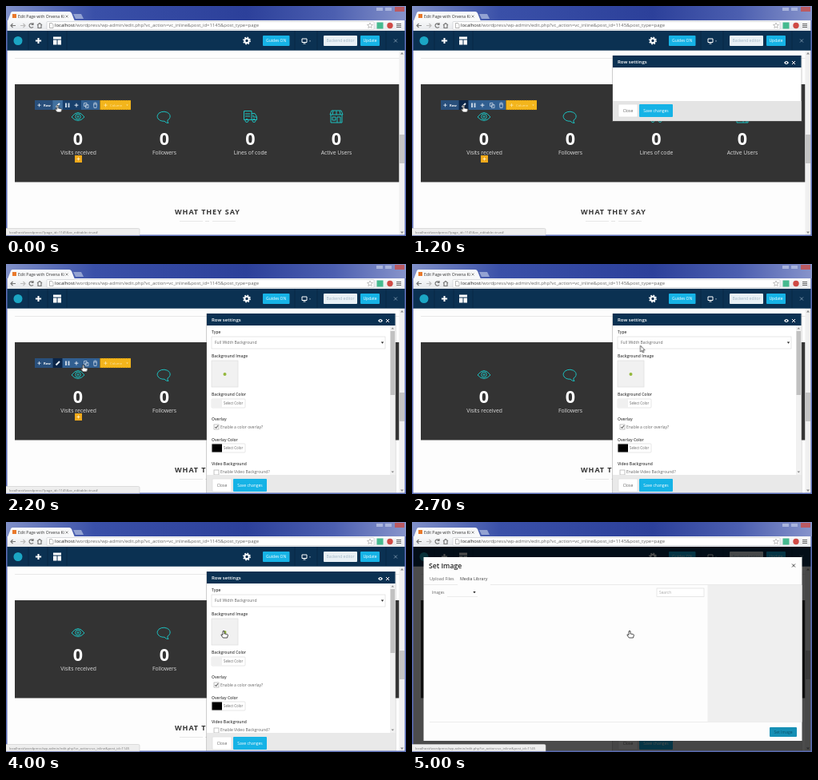
An HTML page that plays this animation: 500 px wide and 288 px high, repeating every 5.05 s.

```html
<!DOCTYPE html>
<html lang="en">
<head>
<meta charset="utf-8">
<title>Page editor</title>
<style>
html, body { margin: 0; width: 100%; height: 100%; overflow: hidden; background: #fff; }
svg { display: block; width: 100%; height: 100%; }
text { font-family: "Open Sans", "Noto Sans", sans-serif; font-size: 5px; fill: #666; }
.w { fill: #fff; }
.mid { text-anchor: middle; }
.label { font-weight: 600; fill: #444; }
.status text { font-size: 4.3px; fill: #777; }
.count { font-size: 21.5px; font-weight: 700; fill: #fff; text-anchor: middle; }
.caption { font-size: 6.8px; fill: #ddd; text-anchor: middle; }
.line { fill: none; stroke: #fff; stroke-width: 1; }
.teal { fill: none; stroke: #1cc0c0; stroke-width: 1; stroke-linejoin: round; }
.box { fill: #fff; stroke: #ddd; stroke-width: .7; }
.cyan { fill: #16b3e6; }
.navy { fill: #0b3152; }

/* 5050 ms loop; hard changes use step-end */
.t { animation: 5050ms step-end infinite; }
.idle { animation-name: idle; }
.hot { animation-name: hot; }
.tools { animation-name: tools; }
.link { animation-name: link; }
.panel { animation-name: panel; }
.short { animation-name: short; }
.full { animation-name: full; }
.over { animation-name: over; }
.modal { animation-name: modal; }
.hand { animation-name: hand; }
.arrow { animation-name: arrow; }
.pointer { animation: move 5050ms ease-in-out infinite; }
@keyframes idle { 0% { opacity: 1 } 4.95%, 100% { opacity: 0 } }
@keyframes hot { 0% { opacity: 0 } 4.95%, 100% { opacity: 1 } }
@keyframes tools { 0% { opacity: 1 } 50.5%, 100% { opacity: 0 } }
@keyframes link { 0% { opacity: 1 } 46.53%, 100% { opacity: 0 } }
@keyframes panel { 0% { opacity: 0 } 19.8%, 100% { opacity: 1 } }
@keyframes short { 0% { opacity: 1 } 30.69%, 100% { opacity: 0 } }
@keyframes full { 0% { opacity: 0 } 30.69%, 100% { opacity: 1 } }
@keyframes over { 0% { opacity: 0 } 77.23%, 100% { opacity: 1 } }
@keyframes modal { 0% { opacity: 0 } 96.04%, 100% { opacity: 1 } }
@keyframes hand { 0% { opacity: 1 } 46.53% { opacity: 0 } 75.25%, 100% { opacity: 1 } }
@keyframes arrow { 0% { opacity: 0 } 46.53% { opacity: 1 } 75.25%, 100% { opacity: 0 } }
@keyframes move {
  0%, 37.62% { transform: translate(63.5px, 124px); animation-timing-function: ease-in }
  43.56% { transform: translate(95px, 126px); animation-timing-function: ease-out }
  56.44%, 65.35% { transform: translate(302px, 100px) }
  76.24%, 100% { transform: translate(271px, 136px) }
}
</style>
</head>
<body>
<svg viewBox="0 0 500 288" preserveAspectRatio="none">
  <defs>
    <linearGradient id="frame" x2="1" y2="0">
      <stop stop-color="#8090c8"/><stop offset=".22" stop-color="#3a50a8"/>
      <stop offset=".6" stop-color="#2c409a"/><stop offset=".82" stop-color="#4c5fb0"/>
      <stop offset="1" stop-color="#8794cb"/>
    </linearGradient>
    <linearGradient id="chrome" x2="0" y2="1">
      <stop stop-color="#f8f9fa"/><stop offset="1" stop-color="#e6e8eb"/>
    </linearGradient>
    <path id="plus" d="M-3 0H3M0-3V3"/>
    <path id="cross" d="M-2-2 2 2M2-2-2 2"/>
    <path id="down" d="M-1.7-1H1.7L0 1.3Z"/>
    <path id="tick" d="M-1.7 0-.4 1.5 2-1.8"/>
    <path id="bubble" d="M0 278.5H165.5Q167 278.5 167 280V287H0Z" fill="#eee" stroke="#ccc" stroke-width=".6"/>
    <g id="swatch">
      <rect class="box" width="42" height="11" rx="1"/>
      <text x="15" y="7.4" style="font-size:4.4px">Select Color</text>
    </g>
    <g id="buttons">
      <rect class="box" x="258" width="24" height="16" rx="1"/>
      <text class="mid" x="270" y="9.8">Close</text>
      <rect class="cyan" x="284" width="42" height="16" rx="1"/>
      <text class="mid w" x="305" y="9.8">Save changes</text>
    </g>
  </defs>

  <!-- browser window -->
  <rect width="500" height="20" fill="url(#frame)"/>
  <path d="M463 2h8v4h-8zM474 2h8v4h-8z" fill="#a9b4dc"/>
  <path d="M486 1h12v6h-12z" fill="#bb5a62"/>
  <path d="M84 10h10l3 6H87z" fill="#93a2d2"/>
  <path d="M2 19 6 8.5Q6.5 7 8 7H79Q81 7 82 9L86 19Z" fill="#f8f9fa"/>
  <rect x="8" y="10" width="5" height="5" fill="#e9792b"/>
  <text x="15" y="15" style="font-size:5.1px;fill:#333">Edit Page with Orvena Ki</text>
  <use href="#cross" transform="translate(76 13) scale(.75)" stroke="#777"/>
  <rect y="18" width="500" height="13" fill="url(#chrome)"/>
  <g fill="none" stroke="#777" stroke-width="1.2">
    <path d="M12 24.5H6m2.5-2.5L6 24.5 8.5 27M39 24l3-2.5 3 2.5M40 24v3.5h4V24"/>
    <path d="M18 24.5h6m-2.5-2.5 2.5 2.5-2.5 2.5" stroke="#bbb"/>
    <path d="M34 23a2.7 2.7 0 1 0 0 3M34 21v2.3h-2.3"/>
  </g>
  <rect x="51" y="19.5" width="409" height="10" rx="1" fill="#fff" stroke="#c5c8cd" stroke-width=".6"/>
  <path d="M54.5 21.5h3l1.5 1.5v4.5h-4.5z" fill="none" stroke="#999" stroke-width=".7"/>
  <text x="61" y="26.4" style="font-size:5.93px"><tspan fill="#222">localhost</tspan>/wordpress/wp-admin/edit.php?vc_action=vc_inline&amp;post_id=1145&amp;post_type=page</text>
  <path d="m455 21 1 2.3 2.5.2-2 1.5.7 2.5-2.2-1.3-2.2 1.3.7-2.5-2-1.5 2.5-.2z" fill="none" stroke="#999" stroke-width=".6"/>
  <rect x="463.5" y="20.5" width="8" height="8" fill="#45ba8f"/>
  <circle cx="480" cy="24.5" r="3.7" fill="#cf4a45"/>
  <path d="M488 22.5h6m-6 2h6m-6 2h6" stroke="#666"/>

  <!-- page -->
  <rect y="55" width="500" height="233" fill="#fdfdfd"/>
  <path d="M11 65.5H492" stroke="#e4e4e4" stroke-width=".8"/>
  <rect x="11" y="98" width="480.5" height="122.5" fill="#333"/>
  <rect x="491.5" y="55" width="7" height="232" fill="#f0f0f0"/>
  <rect x="491.5" y="161" width="6.5" height="36" fill="#c4c4c4"/>
  <path d="M493 60.5 495 58l2 2.5zM493 282.5l2 2.5 2-2.5z" fill="#888"/>
  <g class="teal">
    <path d="M82 139q8-11 16 0q-8 9-16 0Z"/><circle cx="90" cy="138.5" r="3.3"/><circle cx="90" cy="138.5" r="1"/>
    <path d="M202 143a8 6 0 1 0-4 1.2q2 2.5 5 2.3-1.5-1.5-1-3.5Z"/>
    <path d="M297.500 131.500h9.500v11h-9.500zM307 134.500h4l2.500 4v4H307M309 136.500v2.500h4M299 135h6M299 138h6"/>
    <circle cx="301" cy="143.500" r="2"/><circle cx="310" cy="143.500" r="2"/>
    <path d="M407 131h12l2 5h-16zM406 136v10h14v-10M408 139h4v4h-4zM414 146v-7h4v7M409 131l-1 5M413 131v5M417 131l1 5"/>
  </g>
  <text class="count" x="90" y="173.6">0</text><text class="caption" x="90.500" y="185.8">Visits received</text>
  <text class="count" x="198" y="173.6">0</text><text class="caption" x="198" y="185.8">Followers</text>
  <text class="count" x="305.500" y="173.6">0</text><text class="caption" x="305.500" y="185.8">Lines of code</text>
  <text class="count" x="413" y="173.6">0</text><text class="caption" x="413" y="185.8">Active Users</text>
  <text x="211" y="261.3" style="font-size:9px;font-weight:700;letter-spacing:.9px;fill:#333">WHAT THEY SAY</text>
  <path d="M217 269.5h29M258 269.5h29" stroke="#e4e4e4" stroke-width=".8"/>
  <path d="M249 269.5h5" stroke="#ddd" stroke-width=".8"/>

  <!-- editor bar -->
  <rect class="navy" y="31" width="500" height="24.7"/>
  <circle cx="15" cy="43.5" r="5.5" fill="#1ba6c4"/>
  <path d="M28 31v24M52 31v24M76 31v24M361 31v24M389 31v24M475 31v24" stroke="#082641" stroke-width=".7"/>
  <use href="#plus" transform="translate(40.5 43.5) scale(1.2)" stroke="#fff" stroke-width="1.7"/>
  <path d="M59 38.5h10v3H59zM59 42.5h4.5v6H59zM64.5 42.5H69v6h-4.5z" fill="#fff"/>
  <circle cx="301" cy="43.5" r="2.7" fill="none" stroke="#fff" stroke-width="2"/>
  <circle cx="301" cy="43.5" r="4.2" fill="none" stroke="#fff" stroke-width="1.5" stroke-dasharray="1.65"/>
  <rect class="cyan" x="321" y="37" width="33.5" height="13" rx="1"/>
  <text class="mid w" x="337.7" y="45.3">Guides ON</text>
  <path class="line" d="M370 41h6v4.500h-6zM371.500 47h3"/>
  <use href="#down" transform="translate(380 44) scale(.6)" fill="#c5d3df"/>
  <rect x="397" y="37" width="42" height="13" rx="1" fill="#e9f1f6"/>
  <text class="mid" x="418" y="45.3" style="fill:#a3b8c8">Backend editor</text>
  <rect class="cyan" x="443" y="37" width="24" height="13" rx="1"/>
  <text class="mid w" x="455" y="45.3">Update</text>
  <use href="#cross" x="487" y="43.5" stroke="#8aa4b8" stroke-width=".8"/>

  <!-- row controls -->
  <g class="t tools">
    <rect x="36" y="118" width="81" height="12" fill="#315f91"/>
    <rect x="36" y="118" width="22.5" height="12" fill="#294f7b"/>
    <g class="t idle">
      <rect x="58.5" y="118" width="12" height="12" fill="#42719f"/>
      <rect x="71" y="118" width="23" height="12" fill="#183f6b"/>
    </g>
    <rect class="t hot" x="58.5" y="118" width="12" height="12" fill="#0b2547"/>
    <rect x="117.5" y="118" width="38.5" height="12" fill="#f3b51c"/>
    <path d="M118 118.4h38M118 129.6h38" stroke="#d79a09" stroke-width=".7" stroke-dasharray="2 1"/>
    <g stroke="#e6edf5" stroke-width="1.2">
      <use href="#plus" transform="translate(41.5 124.2) scale(.7)"/>
      <use href="#plus" transform="translate(88 124.2) scale(.8)"/>
      <use href="#plus" transform="translate(124.5 124.2) scale(.7)" stroke="#fbe5a8"/>
      <path d="m62.5 126.5 4.5-4.5" stroke-width="2"/>
    </g>
    <text class="w" x="47" y="125.7" style="font-size:4.1px;font-weight:700">Row</text>
    <text x="130" y="125.7" style="font-size:4.2px;fill:#fbe5a8">Column</text>
    <use href="#down" transform="translate(151.5 124.2) scale(.7)" fill="#fbe5a8"/>
    <path d="M74 121.5h2v5.5h-2zM77.5 121.5h2v5.5h-2z" fill="#c2d1e1"/>
    <path d="M97.5 121.5h3.5v4h-3.5zM99.5 123.5h3.5v4h-3.5zM109.500 123h4l-.5 4.5h-3zM109 122h5M110.500 121h2" fill="none" stroke="#c2d1e1" stroke-width=".8"/>
    <rect x="86" y="187" width="9" height="9" fill="#f0a91b"/>
    <use href="#plus" transform="translate(90.5 191.5) scale(.65)" stroke="#ffe9b5" stroke-width="1.5"/>
  </g>

  <!-- settings panel -->
  <g class="t panel">
    <g class="t short">
      <rect x="250" y="62" width="237.5" height="83" fill="#777" opacity=".35"/>
      <rect x="251" y="62" width="235.5" height="82" fill="#fff"/>
      <rect x="251" y="119" width="235.5" height="25" fill="#e4e4e4"/>
      <use href="#buttons" y="123"/>
    </g>
    <g class="t full">
      <rect x="250" y="62" width="237.5" height="226" fill="#777" opacity=".35"/>
      <rect x="251" y="62" width="235.5" height="226" fill="#fff"/>
      <rect x="480" y="77" width="6.5" height="187" fill="#f1f1f1"/>
      <rect x="480.5" y="84" width="5.5" height="80" fill="#c1c1c1"/>
      <path d="m481.5 81.5 1.8-2 1.8 2zM481.5 259.5l1.8 2 1.8-2z" fill="#888"/>
      <text class="label" x="257" y="87">Type</text>
      <text class="label" x="257" y="117">Background Image</text>
      <text class="label" x="257" y="165">Background Color</text>
      <text class="label" x="257" y="196">Overlay</text>
      <text class="label" x="257" y="221.5">Overlay Color</text>
      <text class="label" x="257" y="252">Video Background</text>
      <rect class="box" x="257" y="91" width="217" height="15"/>
      <text x="261" y="100.3">Full Width Background</text>
      <use href="#down" x="470.5" y="98.5" fill="#222"/>
      <rect x="257" y="121" width="33" height="33" fill="#f1f1f1" stroke="#ddd" stroke-width=".7"/>
      <circle cx="273.5" cy="138" r="2" fill="#94b83d"/>
      <use href="#swatch" x="257" y="169"/>
      <rect x="257.5" y="169.5" width="12.5" height="10" fill="#f0f0f0"/>
      <use href="#swatch" x="257" y="225"/>
      <rect x="257.5" y="225.5" width="12.5" height="10"/>
      <rect class="box" x="260" y="201" width="6" height="6" style="stroke:#aaa"/>
      <use href="#tick" x="263" y="204" fill="none" stroke="#333"/>
      <text x="268" y="205.5">Enable a color overlay?</text>
      <rect class="box" x="260" y="258" width="6" height="6" style="stroke:#aaa"/>
      <text x="268" y="262.3">Enable Video Background?</text>
      <rect x="251" y="264" width="235.5" height="24" fill="#e9e9e9"/>
      <use href="#buttons" y="269"/>
    </g>
    <rect class="navy" x="251" y="62" width="235.5" height="15"/>
    <text class="w" x="257" y="72" style="font-size:6px;font-weight:600">Row settings</text>
    <path d="M465 71q3-4 6 0q-3 4-6 0Z" fill="#fff"/><circle cx="468" cy="71" r="1" fill="#0b3152"/>
    <use href="#cross" x="477" y="71" stroke="#fff"/>
  </g>

  <!-- media dialog -->
  <g class="t modal">
    <rect y="31" width="500" height="257" opacity=".7"/>
    <rect x="14.5" y="44" width="473" height="230" fill="#fdfdfd"/>
    <text x="21" y="58" style="font-size:8.7px;font-weight:600;fill:#222">Set Image</text>
    <use href="#cross" x="477" y="54.5" stroke="#444"/>
    <path d="M15 78.5H57M98 78.5H487" stroke="#e3e3e3" stroke-width=".7"/>
    <text x="22" y="73.2" style="font-size:5.4px">Upload Files</text>
    <text x="60" y="73.2" style="font-size:5.4px;fill:#444">Media Library</text>
    <text x="25" y="89.8" style="font-size:4.6px">Images</text>
    <path d="M44 93.5h38M22 250.5h465" stroke="#e5e5e5" stroke-width=".7"/>
    <use href="#down" x="78" y="88" fill="#222"/>
    <rect class="box" x="306" y="83" width="59" height="10.5"/>
    <text x="309" y="90" style="fill:#aaa;font-size:4.8px">Search</text>
    <rect x="369.5" y="79" width="118" height="171.5" fill="#efefef"/>
    <rect x="447" y="257" width="34" height="12" rx="1" fill="#168fb5"/>
    <text class="mid" x="464" y="264.8" style="fill:#0b526b">Set Image</text>
  </g>

  <path d="M.8 18V287.200H499.200V18" fill="none" stroke="#5a6cb4" stroke-width="1.6"/>

  <!-- link previews -->
  <g class="t link status">
    <use href="#bubble"/>
    <text x="4" y="284.5">localhost/wordpress/?page_id=1145&amp;vc_editable=true#</text>
  </g>
  <g class="t over status">
    <use href="#bubble"/>
    <text x="4" y="284.5">localhost/wordpress/wp-admin/edit.php?vc_action=vc_inline&amp;post_id=1145</text>
  </g>

  <g class="pointer">
    <path class="t hand" d="M0 .8Q1-.4 2 .8V4L5.5 4.5Q6.5 4.8 6.3 6L5.5 9H.3L-2 5.8Q-2.2 4.5-1 4.8L0 5.5Z" fill="#fff" stroke="#222" stroke-width=".8"/>
    <path class="t arrow" d="M0 0V8L1.9 6.3 3.2 9 4.4 8.4 3.2 5.8H5.7Z" fill="#fff" stroke="#222" stroke-width=".7"/>
  </g>
</svg>
</body>
</html>
```
